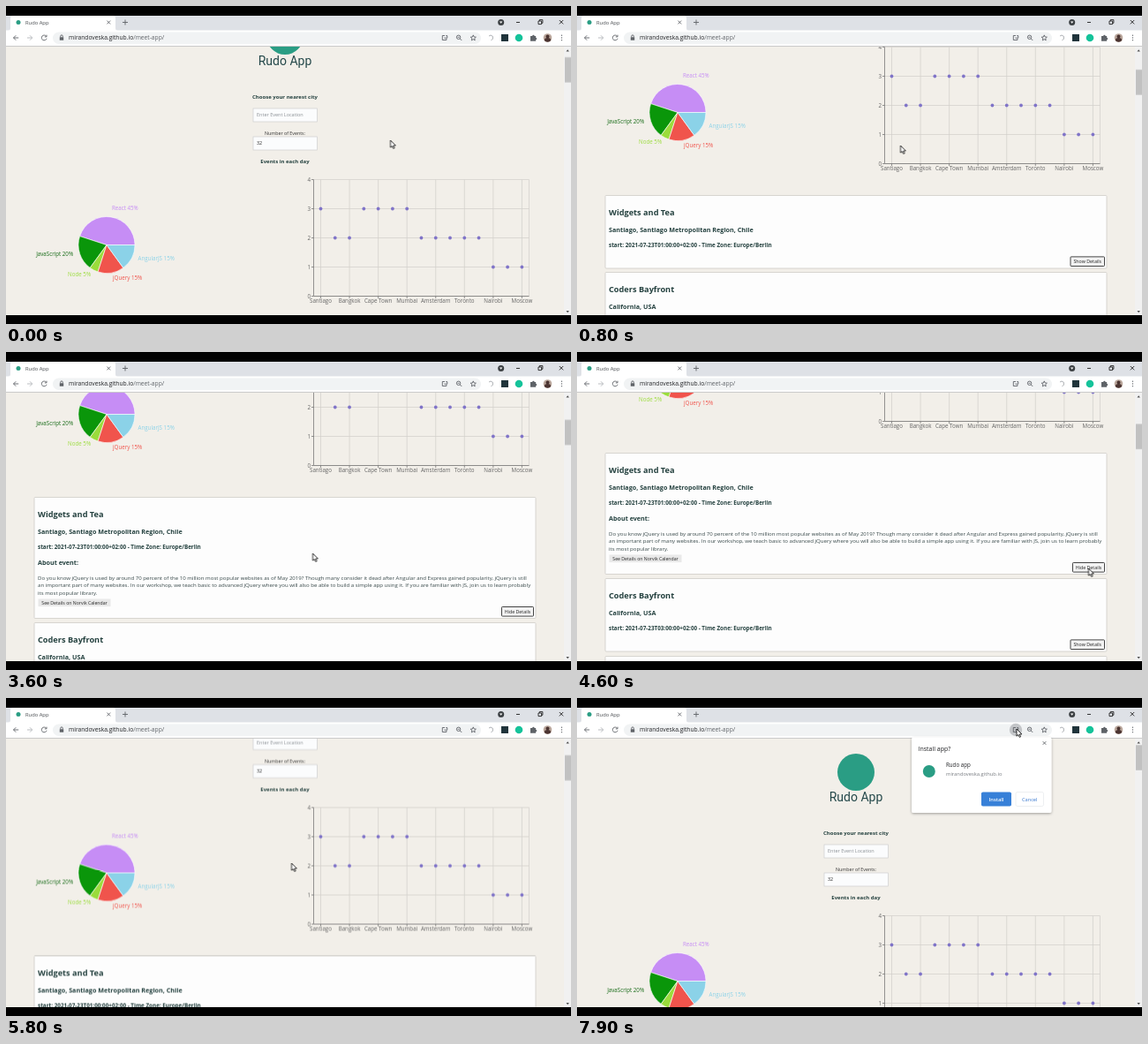
Write an HTML page that moves like this. It is 640 px wide and 360 px high and loops after 8000 ms.

```html
<!DOCTYPE html>
<html lang="en">
<head>
<meta charset="utf-8">
<title>Rudo App</title>
<style>
  html, body { margin: 0; width: 100%; height: 100%; overflow: hidden; background: #000; }
  svg { display: block; width: 640px; height: 360px; }
  text { font: 6.2px "Open Sans", "Noto Sans", sans-serif; white-space: pre; }
  .mid { text-anchor: middle; }
  .end { text-anchor: end; }
  .bold { font-weight: 700; fill: #24413f; }
  .small { font-size: 5.3px; }
  .brand { font: 14px Roboto, sans-serif; fill: #24484a; }
  .icon { fill: none; stroke: #5f6368; stroke-width: .9; }
  .field { fill: #fbfcfd; stroke: #cfcfcf; stroke-width: .7; }
  .card { fill: #fdfdfd; stroke: #cfccc7; stroke-width: .8; }
  .button { fill: #f3f3f3; stroke: #303030; stroke-width: .9; }

  #page, #thumb, #cursor, #rest { animation: 8s linear infinite; }
  #page { animation-name: scroll; }
  #thumb { animation-name: thumb; }
  #cursor { animation-name: cursor; }
  #rest { animation-name: push; animation-timing-function: step-end; }
  .opened, .closed, #tip, #dialog, #hover { animation: 8s step-end infinite; }
  .opened { animation-name: opened; }
  .closed { animation-name: closed; }
  #tip { animation-name: tip; }
  #dialog { animation-name: dialog; }
  #hover { animation-name: hover; }

  @keyframes scroll {
    0%, 1.25% { transform: translateY(-50px); }
    9.4%, 40.6% { transform: translateY(-200px); }
    43.75%, 46.9% { transform: translateY(-250px); }
    50.6%, 67% { transform: translateY(-300px); }
    72.5% { transform: translateY(-123px); }
    76%, 100% { transform: translateY(0); }
  }
  @keyframes thumb {
    0%, 1.25% { transform: translateY(4.7px); }
    9.4%, 40.6% { transform: translateY(18.8px); }
    43.75%, 46.9% { transform: translateY(23.5px); }
    50.6%, 67% { transform: translateY(28.2px); }
    72.5% { transform: translateY(11.6px); }
    76%, 100% { transform: translateY(0); }
  }
  @keyframes cursor {
    0%, 1.25% { transform: translate(435.5px, 152px); }
    10%, 12.5% { transform: translate(366.5px, 158px); }
    22.5%, 31% { transform: translate(404.5px, 82px); }
    37.2%, 39.5% { transform: translate(578px, 288px); }
    44.8%, 48.5% { transform: translate(347.5px, 228px); }
    56.5%, 62% { transform: translate(579.5px, 245px); }
    70.5%, 79.5% { transform: translate(323.5px, 187px); }
    90%, 100% { transform: translate(498px, 35px); }
  }
  @keyframes push { 0%, 61% { transform: none; } 38.5% { transform: translateY(55px); } 100% { transform: none; } }
  @keyframes opened { 0%, 61%, 100% { opacity: 0; } 38.5% { opacity: 1; } }
  @keyframes closed { 0%, 61%, 100% { opacity: 1; } 38.5% { opacity: 0; } }
  @keyframes tip { 0%, 31.3%, 100% { opacity: 0; } 22.5% { opacity: 1; } }
  @keyframes dialog { 0% { opacity: 0; } 93.5%, 100% { opacity: 1; } }
  @keyframes hover { 0% { opacity: 0; } 89%, 100% { opacity: 1; } }
</style>
</head>
<body>
<svg viewBox="0 0 640 360">
  <defs>
    <clipPath id="view"><rect y="46" width="632" height="304"/></clipPath>
    <filter id="shadow" x="-10%" y="-10%" width="120%" height="130%">
      <feDropShadow dx="0" dy="1" stdDeviation="1.6" flood-opacity=".35"/>
    </filter>
  </defs>
  <rect width="640" height="360"/>
  <rect y="46" width="640" height="304" fill="#f2efe9"/>

  <g clip-path="url(#view)">
    <g id="page">
      <circle cx="316" cy="84" r="21" fill="#2a9d84"/>
      <text class="brand mid" x="316" y="117">Rudo App</text>
      <text class="bold mid" x="316" y="155.2" style="font-size:6px">Choose your nearest city</text>
      <rect class="field" x="280" y="166" width="72.5" height="15"/>
      <text x="284" y="175.3" fill="#8a8f94" style="font-size:5.5px">Enter Event Location</text>
      <text class="small mid" x="316" y="196" fill="#333">Number of Events:</text>
      <rect class="field" x="280" y="198" width="72.5" height="15"/>
      <text class="small" x="284" y="207" fill="#222">32</text>
      <text class="bold mid" x="316" y="228.2" style="font-size:6px">Events in each day</text>
      <g id="pie"></g>
      <g id="chart"></g>
      <g id="cards"></g>
      <g id="tip">
        <rect x="385" y="283.5" width="66" height="32.5" fill="#fff" stroke="#ccc" stroke-width=".6"/>
        <text class="mid" x="418" y="296.2" fill="#333">city : Berlin</text>
        <text class="mid" x="418" y="308.2" fill="#333">number of events : 3</text>
      </g>
    </g>
  </g>

  <!-- scrollbar -->
  <rect x="632" y="46" width="8" height="304" fill="#f1f1f1"/>
  <path d="M634.5 51.5h3.4l-1.7-2.2zM634.5 345h3.4l-1.7 2.2z" fill="#505050"/>
  <rect id="thumb" x="633" y="53.3" width="7" height="28.5" fill="#c1c1c1"/>

  <!-- browser frame -->
  <rect y="11" width="640" height="17" fill="#dee1e6"/>
  <path d="M2 28q3 0 3-3V14q0-3 3-3H121q3 0 3 3V25q0 3 3 3z" fill="#fff"/>
  <rect y="27.5" width="640" height="18" fill="#fff"/>
  <rect y="45.2" width="640" height=".8" fill="#dcdcdc"/>
  <circle cx="14" cy="18.5" r="2.5" fill="#2a9d84"/>
  <text x="22" y="20.6" fill="#45494d" style="font-size:5.8px">Rudo App</text>
  <g class="icon">
    <path d="M114.4 16.6l3.8 3.8m0-3.8l-3.8 3.8M132 18.5h6m-3-3v6"/>
    <path d="M578 18.5h4M603 17h3.6v3.6H603zM604.3 17v-1.4h3.6v3.7h-1.3M626.8 16l4.4 4.4m0-4.4l-4.4 4.4" stroke="#222"/>
    <path d="M14.2 36H8.5m2.7-2.7L8.5 36l2.7 2.7"/>
    <path d="M24 36h5.7M27 33.3l2.7 2.7-2.7 2.7" stroke="#b4b7ba"/>
    <path d="M45.6 34.3a2.9 2.9 0 1 0 .4 2.5M46 32.7v2.2h-2.2"/>
  </g>
  <circle cx="560.7" cy="18.5" r="3.5" fill="#3c4043"/>
  <path d="M559 17.5h3.4l-1.7 2.2z" fill="#fff"/>
  <rect x="53" y="29.5" width="485" height="13.5" rx="6.75" fill="#f1f3f4"/>
  <path d="M60.8 35.2h4.4v3.6h-4.4z" fill="#5f6368"/>
  <path class="icon" d="M61.7 35.2v-1a1.3 1.3 0 0 1 2.6 0v1"/>
  <text x="71" y="38.4" fill="#202124" style="font-size:6.7px">mirandoveska.github.io<tspan fill="#5f6368">/meet-app/</tspan></text>
  <circle id="hover" cx="497" cy="36" r="7.2" fill="#c3c5c8"/>
  <g class="icon">
    <path d="M497 33.5h-2.7v5h4.6V37M496.3 36.2h3.5v-2.6h-1.6"/>
    <circle cx="512.6" cy="35.3" r="2.2"/>
    <path d="M514.3 37l2 2M511.6 35.3h2"/>
    <path d="M529.3 32.9l.9 2.1 2.2.2-1.7 1.5.5 2.2-1.9-1.2-1.9 1.2.5-2.2-1.7-1.5 2.2-.2z"/>
    <path d="M547 34l2-1 2.4 1.4v3l-2 1.4" stroke="#a4a8ac"/>
  </g>
  <rect x="561" y="32" width="8" height="8" fill="#20343b"/>
  <circle cx="581" cy="36" r="4.3" fill="#15c39a"/>
  <path d="M594 34h2.2a1.2 1.2 0 0 1 2.4 0h1.6v2a1.1 1.1 0 0 1 0 2.2v1.6H594z" fill="#5f6368"/>
  <circle cx="613.5" cy="36" r="4.8" fill="#bba89d"/>
  <path d="M609.8 39a3.7 2.9 0 0 1 7.4 0 4.8 4.8 0 0 1-7.4 0z" fill="#4b3431"/>
  <circle cx="613.5" cy="34.5" r="2" fill="#4b3431"/>
  <path d="M629.5 33.2v.1m0 2.6v.1m0 2.6v.1" stroke="#5f6368" stroke-width="1.3" stroke-linecap="round"/>

  <g id="dialog">
    <rect x="379" y="44.5" width="158.5" height="85.5" rx="2" fill="#fff" filter="url(#shadow)"/>
    <text x="386.5" y="60" fill="#202124" style="font-size:7px">Install app?</text>
    <path class="icon" d="M527.7 49.2l3.6 3.6m0-3.6l-3.6 3.6"/>
    <circle cx="398.8" cy="83" r="7" fill="#2a9d84"/>
    <text x="418" y="78.3" fill="#202124">Rudo app</text>
    <text x="418" y="88" fill="#777b80" style="font-size:5.8px">mirandoveska.github.io</text>
    <rect x="458" y="106.5" width="34" height="16" rx="1.8" fill="#3780d8"/>
    <text class="mid" x="475" y="116.7" fill="#fff" style="font-size:5.7px;font-weight:600">Install</text>
    <rect x="497" y="106.5" width="31.5" height="16" rx="1.8" fill="#fff" stroke="#e6e8eb" stroke-width=".7"/>
    <text class="mid" x="512.7" y="116.7" fill="#3b7ad0" style="font-size:5.7px">Cancel</text>
  </g>

  <path id="cursor" d="M0 0v8.2l1.9-1.7 1.3 2.9 1.4-.6-1.3-2.8h2.6z" fill="#fff" stroke="#000" stroke-width=".8"/>
</svg>

<script>
  const put = (id, markup) => document.getElementById(id).innerHTML = markup;
  const text = (x, y, label, cls = '', style = '') =>
    `<text x="${x}" y="${y}" class="${cls}" style="${style}">${label}</text>`;
  const line = (x1, y1, x2, y2, color) =>
    `<path d="M${x1} ${y1}L${x2} ${y2}" stroke="${color}" stroke-width=".7"/>`;

  // share, label, colour, label x, label baseline, anchor
  const slices = [
    [45, 'React', '#c68df5', 120, 280.6, ''],
    [20, 'JavaScript', '#0a960a', 76, 332.6, 'end'],
    [5, 'Node', '#9bdc3c', 96, 355.8, 'end'],
    [15, 'jQuery', '#f0544c', 121, 359.8, ''],
    [15, 'AngularJS', '#8bd2e8', 149.5, 338.4, '']
  ];
  function pie(cx, cy, r) {
    let sum = 0;
    const rim = () => {
      const a = sum / 50 * Math.PI;
      return `${cx + r * Math.cos(a)} ${cy - r * Math.sin(a)}`;
    };
    return slices.map(([share, name, color, x, y, anchor]) => {
      const from = rim();
      sum += share;
      const ink = name === 'JavaScript' ? '#176b17' : color;
      return `<path d="M${cx} ${cy}L${from}A${r} ${r} 0 0 0 ${rim()}z" fill="${color}" stroke="#fff" stroke-width=".6"/>`
        + text(x, y, `${name} ${share}%`, anchor, `fill:${ink}`);
    }).join('');
  }

  const counts = [3, 2, 2, 3, 3, 3, 3, 2, 2, 2, 2, 2, 1, 1, 1];
  const cities = ['Santiago', 'Bangkok', 'Cape Town', 'Mumbai', 'Amsterdam', 'Toronto', 'Nairobi', 'Moscow'];
  function chart() {
    const left = 348.5, right = 592.5, top = 246.5, base = 378.5;
    const px = i => 356.5 + i * 16.28;
    const py = v => base - v * 33;
    const grid = '#d2cfca', axis = '#6b6b6b';
    let out = line(right, top, right, base, grid);
    for (let v = 0; v <= 4; v++) {
      out += line(left, py(v), right, py(v), grid) + line(left - 2.5, py(v), left, py(v), axis)
        + text(345, py(v) + 2.1, v, 'end', 'fill:#666');
    }
    cities.forEach((city, i) => {
      const x = px(i * 2);
      out += line(x, top, x, base, grid) + line(x, base, x, base + 2.5, axis)
        + text(x, base + 7.6, city, 'mid', 'fill:#666');
    });
    out += line(left, top, left, base, axis) + line(left, base, right, base, axis);
    return out + counts.map((v, i) => `<circle cx="${px(i)}" cy="${py(v)}" r="1.9" fill="#8074c8"/>`).join('');
  }

  const about = [
    'Do you know jQuery is used by around 70 percent of the 10 million most popular websites as of May 2019? Though many consider it dead after Angular and Express gained popularity, jQuery is still',
    'an important part of many websites. In our workshop, we teach basic to advanced jQuery where you will also be able to build a simple app using it. If you are familiar with JS, join us to learn probably',
    'its most popular library.'
  ];
  const box = (y, h) => `<rect class="card" x="32" y="${y}" width="568" height="${h}" rx="1"/>`;
  const button = (x, y, w, label) =>
    `<rect class="button" x="${x}" y="${y}" width="${w}" height="10.6" rx=".8"/>`
    + text(x + w / 2, y + 7.2, label, 'mid small', 'fill:#222');
  const heading = (y, title, place, hour) =>
    text(36, y + 22.7, title, 'bold', 'font-size:9.2px')
    + text(36, y + 41, place, 'bold', 'font-size:7.2px')
    + text(36, y + 58.4, `start: 2021-07-23T${hour}:00:00+02:00 - Time Zone: Europe/Berlin`, 'bold', 'font-size:6.3px');
  const show = y => button(559, y + 69.4, 38.5, 'Show Details');
  const closedCard = (y, ...info) => box(y, 82.5) + heading(y, ...info) + show(y);

  function cards() {
    const y = 414.5;
    const details = box(y, 137)
      + text(36, y + 76.6, 'About event:', 'bold', 'font-size:7.2px')
      + about.map((row, i) => text(36, y + 93.2 + i * 8.6, row, '', 'font-size:6.08px;fill:#38494a')).join('')
      + `<rect x="36.5" y="${y + 115}" width="82" height="8.6" fill="#e9e9e9"/>`
      + text(77.5, y + 121.2, 'See Details on Norvik Calendar', 'mid', 'font-size:5.2px;fill:#222')
      + button(561.5, y + 124, 36, 'Hide Details');
    return `<g class="closed">${box(y, 82.5)}${show(y)}</g><g class="opened">${details}</g>`
      + heading(y, 'Widgets and Tea', 'Santiago, Santiago Metropolitan Region, Chile', '01')
      + '<g id="rest">'
      + closedCard(y + 87, 'Coders Bayfront', 'California, USA', '03')
      + closedCard(y + 175, 'AngularJS Basics', 'Bangkok, Thailand', '04')
      + '</g>';
  }

  put('pie', pie(114, 320.5, 32));
  put('chart', chart());
  put('cards', cards());
</script>
</body>
</html>
```
